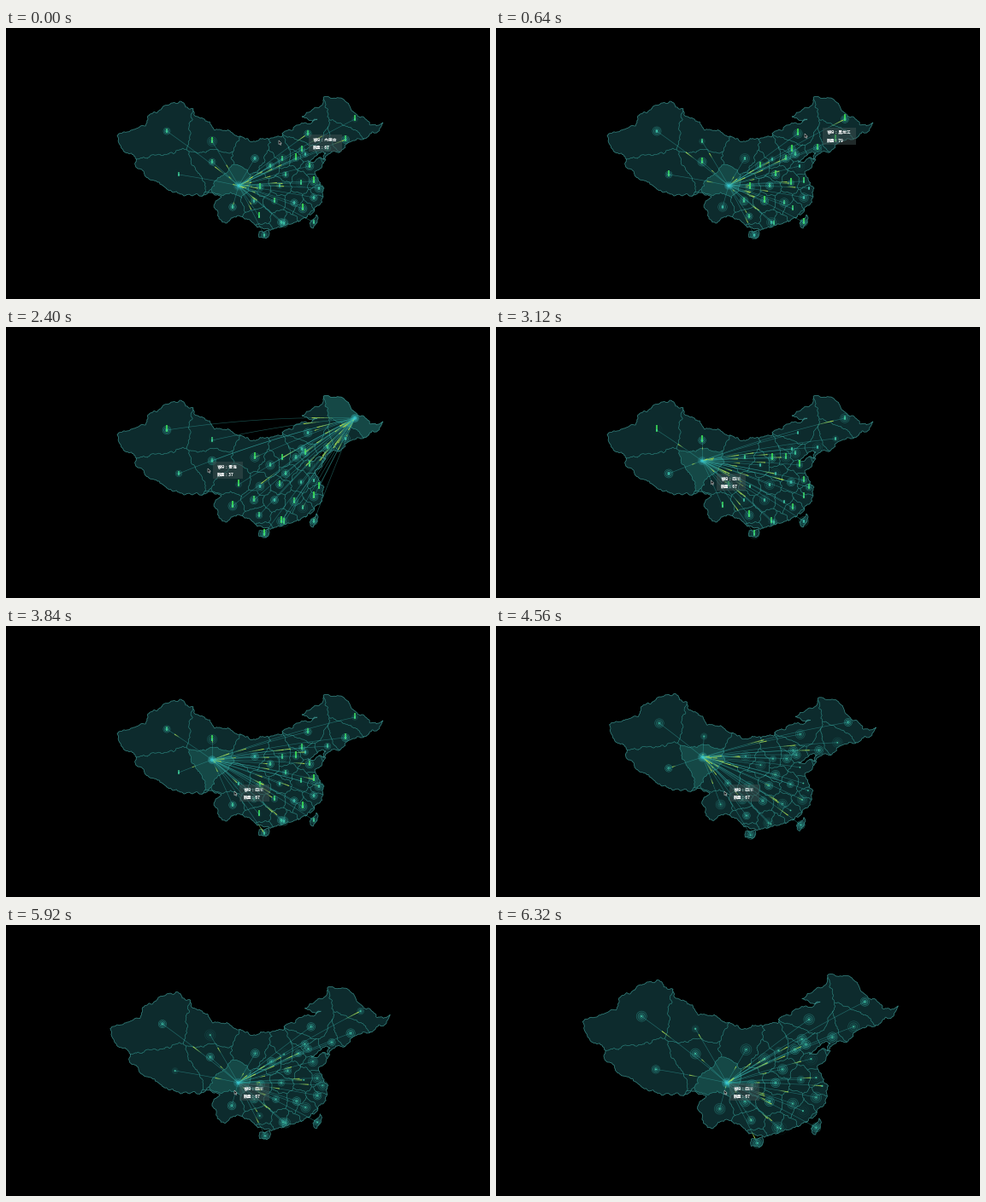
These frames come from a looping animation (566x318 px, 6400 ms). A matplotlib script:

```python
import math
import random

import numpy as np
import matplotlib.pyplot as plt
from matplotlib.animation import FuncAnimation
from matplotlib.collections import LineCollection
from matplotlib.patches import PathPatch, Polygon, Rectangle
from matplotlib.path import Path
from matplotlib.transforms import Affine2D

W, H, DPI = 566, 318, 100
STEP, LOOP = 80, 6400
PX = 72 / DPI
TEAL = np.array([.20, .66, .62])
GREEN = np.array([.25, .95, .32])

# Key points of the outline, clockwise from the western tip
FRONTIER = [(130, 126), (150, 119), (163, 115), (166, 103), (181, 96), (195, 88),
            (203, 86), (219, 95), (221, 103), (238, 110), (244, 120), (283, 130),
            (322, 128), (326, 121), (336, 119), (364, 107), (346, 104), (358, 96),
            (370, 90), (371, 82), (391, 82), (401, 90), (407, 99), (425, 113),
            (441, 111), (436, 121), (423, 128), (406, 132)]
COAST = [(385, 145), (371, 154), (374, 147), (363, 150), (353, 157), (374, 154),
         (361, 169), (372, 188), (371, 198), (364, 208), (353, 219), (338, 228),
         (316, 235), (302, 236), (288, 228), (277, 222), (266, 222), (258, 229),
         (249, 224), (243, 210), (252, 198), (240, 193), (218, 197), (182, 184),
         (154, 165), (151, 151), (134, 138)]
ISLANDS = [
    [(296, 239), (307, 237), (304, 247), (296, 246)],
    [(363, 219), (364, 227), (359, 235), (355, 229)],
]

PLACES = {
    "xinjiang": (188, 121), "tibet": (202, 172), "qinghai": (241, 157),
    "gansu": (241, 133), "sichuan": (272, 185), "yunnan": (265, 210),
    "ningxia": (291, 153), "mongolia": (353, 124), "heilongjiang": (408, 107),
    "jilin": (397, 131), "liaoning": (376, 141), "beijing": (346, 143),
    "tianjin": (350, 148), "hebei": (339, 153), "shanxi": (323, 154),
    "shaanxi": (309, 162), "henan": (327, 172), "shandong": (355, 162),
    "jiangsu": (360, 180), "shanghai": (366, 188), "anhui": (345, 182),
    "hubei": (320, 185), "chongqing": (297, 187), "guizhou": (290, 203),
    "guangxi": (296, 221), "hunan": (314, 203), "jiangxi": (337, 205),
    "zhejiang": (360, 199), "fujian": (347, 212), "guangdong": (322, 228),
    "hongkong": (325, 229), "hainan": (302, 243), "taiwan": (360, 228),
}
NAMES = list(PLACES)
SPOTS = np.array(list(PLACES.values()), float)

# Start time, then what is selected or pointed at
ACTIVE = [(0, "sichuan"), (960, "heilongjiang"), (2720, "qinghai"), (5920, "sichuan")]
TIPS = [(0, "mongolia", "内蒙古", 67), (400, "heilongjiang", "黑龙江", 79),
        (1760, "qinghai", "青海", 37), (2880, "sichuan", "四川", 67)]
CURSOR_START = (319, 132)

rng = np.random.default_rng(8)
ring_phase, flow_phase, bar_phase = rng.random((3, len(NAMES)))


def ramp(t, start, end):
    return min(max((t - start) / (end - start), 0), 1)


def smooth(s):
    return s * s * (3 - 2 * s)


def current(schedule, t):
    return [row for row in schedule if row[0] <= t][-1]


def glide(stops, t, span=480):
    """Position on a tour of (start time, point) stops, eased between them."""
    pos = np.array(stops[0][1], float)
    for start, point in stops[1:]:
        pos += (np.array(point) - pos) * smooth(ramp(t, start, start + span))
    return pos


def rough_edge(p, q):
    """Jagged line, the same in both directions."""
    flip = (p.real, p.imag) > (q.real, q.imag)
    pts = [q, p] if flip else [p, q]
    dice = random.Random("{:.1f} {:.1f}".format(*pts))
    while abs(pts[1] - pts[0]) > 2:
        out = pts[:1]
        for u, v in zip(pts, pts[1:]):
            bend = min(.22, 3 / abs(v - u))
            out += [(u + v) / 2 + 1j * (v - u) * dice.uniform(-bend, bend), v]
        pts = out
    return pts[::-1] if flip else pts


def rough_ring(corners):
    ring = [z for p, q in zip(corners, corners[1:] + corners[:1])
            for z in rough_edge(p, q)]
    return np.column_stack([np.real(ring), np.imag(ring)])


def cell(i, sites):
    """Region nearer to site i than to any other site."""
    poly = [90 + 50j, 490 + 50j, 490 + 270j, 90 + 270j]
    for site in np.delete(sites, i):
        mid, axis = (sites[i] + site) / 2, site - sites[i]
        side = [((z - mid) * axis.conjugate()).real for z in poly]
        kept = []
        for k, z in enumerate(poly):
            if side[k - 1] * side[k] < 0:
                share = side[k - 1] / (side[k - 1] - side[k])
                kept.append(poly[k - 1] + (z - poly[k - 1]) * share)
            if side[k] <= 0:
                kept.append(z)
        poly = kept
    return rough_ring(poly)


def arcs(a, b, u):
    """Points at fractions u (n, m) of slightly raised links from a to b (n, 2)."""
    d = b - a
    pts = a + d[:, None] * u[..., None]
    lift = 20 * (np.hypot(*d.T) / 220) ** 2
    pts[..., 1] -= lift[:, None] * u * (1 - u)
    return pts


def rgba(rgb, alpha):
    alpha = np.asarray(alpha)[:, None]
    return np.hstack([np.broadcast_to(rgb, (len(alpha), 3)), alpha])


fig = plt.figure(figsize=(W / DPI, H / DPI), dpi=DPI, facecolor="black")
ax = fig.add_axes([0, 0, 1, 1])
ax.set_xlim(0, W)
ax.set_ylim(H, 0)
ax.axis("off")

view = Affine2D()
on_map = view + ax.transData


def lines(width, z, **style):
    coll = LineCollection([], linewidths=width * PX, zorder=z, **style)
    ax.add_collection(coll, autolim=False)
    return coll


# Map
shores = [rough_ring([complex(*p) for p in s]) for s in [FRONTIER + COAST] + ISLANDS]
land = Path.make_compound_path(*[Path(np.vstack([s, s[:1]]), closed=True) for s in shores])
ax.add_patch(PathPatch(land, fc="#0d2b2d", ec="none", transform=on_map, zorder=1))

cells = [cell(i, SPOTS @ [1, 1j]) for i in range(len(NAMES))]
chosen = ax.add_patch(Polygon(cells[0], fc="#154846", ec="none",
                              transform=on_map, zorder=2))
borders = lines(.6, 3, colors=[(.20, .60, .57, .5)], transform=on_map)
borders.set_segments(cells)
for artist in (chosen, borders):
    artist.set_clip_path(land, on_map)
ax.add_patch(PathPatch(land, fc="none", ec=(.25, .62, .60, .8), lw=.75 * PX,
                       transform=on_map, zorder=3))

# Moving parts
rings = ax.scatter([], [], zorder=4, linewidths=.6 * PX)
links = lines(.65, 5, colors=[(.22, .70, .68, .45)])
streaks = lines(.95, 6)
bars = lines(1.7, 7)
bars.set_capstyle("butt")
dots = ax.scatter([], [], zorder=7, linewidths=0)
hub = ax.scatter([], [], zorder=8, linewidths=0)

# Tooltip and cursor
box = ax.add_patch(Rectangle((0, 0), 1, 20, fc=(.25, .32, .32, .5), ec="none", zorder=9))
style = dict(color="white", fontsize=4.75 * PX, fontfamily="Noto Sans CJK JP",
             fontweight="bold", va="center", ha="left", zorder=10)
tip_name = ax.text(0, 0, "", **style)
tip_count = ax.text(0, 0, "", **style)
ARROW = np.array([(0, 0), (0, 4.6), (1.1, 3.6), (2, 5.4), (2.7, 5), (1.9, 3.3), (3.3, 3.2)])
cursor = ax.add_patch(Polygon(ARROW, fc="black", ec="#d8d8d8", lw=.5 * PX, zorder=11))


def set_view(t):
    """Turn the map and back, tip it upright, then zoom in."""
    turn = .06 * math.sin(math.pi * ramp(t, 3920, 5200))
    zoom = ramp(t, 5760, 6320)
    sx = 1 + .187 * zoom
    sy = 1 + .02 * ramp(t, 3920, 4400) + .2 * zoom
    view.set_matrix([[sx, -turn, 283 * (1 - sx) + 170 * turn],
                     [turn, sy, 184 * (1 - sy) - 283 * turn],
                     [0, 0, 1]])
    return sx


def draw_rings(t, spots, zoom):
    life = (t / 1900 + ring_phase) % 1
    radius = zoom * np.outer(3 + 3.2 * life, [1, .68, .36]).ravel()
    fade = np.outer(np.sin(math.pi * life), [.55, .7, .85]).ravel()
    rings.set_offsets(np.repeat(spots, 3, axis=0))
    rings.set_sizes((2 * radius * PX) ** 2)
    rings.set_edgecolors(rgba(TEAL, fade))
    rings.set_facecolors(rgba(TEAL, .14 * fade))


def draw_links(t, spots, home):
    away = np.arange(len(NAMES)) != home
    start, ends = spots[home], spots[away]
    links.set_segments(arcs(start, ends, np.tile(np.linspace(0, 1, 17), (len(ends), 1))))
    head = (t / 2400 + flow_phase[away]) % 1.1
    pts = arcs(start, ends, np.clip(head[:, None] - np.linspace(.11, 0, 6), 0, 1))
    streaks.set_segments(np.stack([pts[:, :-1], pts[:, 1:]], axis=2).reshape(-1, 2, 2))
    streaks.set_color(rgba((.74, .90, .28), np.tile(np.linspace(.15, .9, 5), len(ends))))


def draw_bars(t, spots, home, zoom):
    tall = 1 - ramp(t, 3920, 4400)
    pulse = .5 + .5 * np.cos(2 * math.pi * (t / 3840 - bar_phase))
    height = tall * (3 + 4.5 * pulse)
    height[home] = 0
    foot = spots + [0, 1.5 * tall]
    bars.set_segments(np.stack([foot, foot - np.outer(height, [0, 1])], axis=1))
    bars.set_color(rgba(TEAL + np.outer(pulse, GREEN - TEAL), .9 * (height > 0)))
    dots.set_offsets(spots)
    dots.set_sizes(np.full(len(spots), (1.8 * zoom * PX) ** 2))
    dots.set_facecolors([(.27, .82, .68, .85)])
    hub.set_offsets(np.tile(spots[home], (3, 1)))
    hub.set_sizes((np.array([10, 5.5, 2.8]) * zoom * PX) ** 2)
    hub.set_facecolors(rgba((.22, .78, .82), [.22, .4, .85]))


def draw_tip(t):
    _, _, name, count = current(TIPS, t)
    spots = [(start, np.array(PLACES[place])) for start, place, *_ in TIPS]
    x, y = glide([(s, p + [1, 1]) for s, p in spots], t)
    label = f"省份：{name}"
    box.set_bounds(x, y, 4.7 * len(label) + 11, 20)
    tip_name.set_text(label)
    tip_name.set_position((x + 5, y + 5.3))
    tip_count.set_text(f"数量：{count}")
    tip_count.set_position((x + 5, y + 15))
    path = [(0, CURSOR_START)] + [(s, p + [-5, 9]) for s, p in spots[1:]]
    cursor.set_xy(ARROW + glide(path, t))


def update(i):
    t = i * STEP
    zoom = set_view(t)
    spots = view.transform(SPOTS)
    home = NAMES.index(current(ACTIVE, t)[1])
    chosen.set_xy(cells[home])
    draw_rings(t, spots, zoom)
    draw_links(t, spots, home)
    draw_bars(t, spots, home, zoom)
    draw_tip(t)
    return []


anim = FuncAnimation(fig, update, frames=LOOP // STEP, interval=STEP,
                     init_func=lambda: [], repeat=True, repeat_delay=0, blit=False)
plt.show()
```
